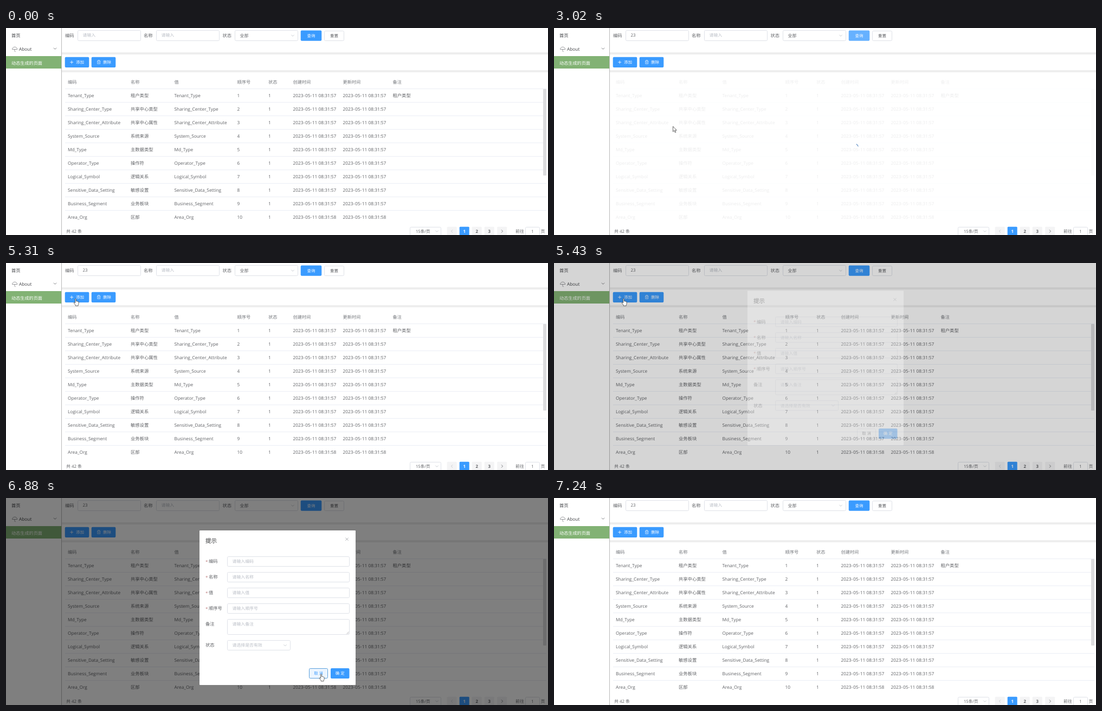
These frames come from a looping animation (1000x383 px, 8.61 s). An HTML page:

```html
<!DOCTYPE html>
<html lang="zh-CN">
<head>
<meta charset="utf-8">
<style>
html, body { margin: 0; height: 100%; overflow: hidden; background: #fff; }
svg { display: block; width: 100%; height: 100%; }
text {
  font-family: "Open Sans", "Noto Sans CJK SC", "Noto Sans CJK", sans-serif;
  text-rendering: geometricPrecision;
  white-space: pre;
}
.dash { letter-spacing: .09em; }
</style>
</head>
<body>
<svg id="stage" viewBox="0 0 1000 383"></svg>
<script>
const LOOP = 8610;
const BLUE = '#3a9bff', HOVER = '#66b1ff', INK = '#606266', HINT = '#bbbfc7';
const EDGE = '#dfe2e8', EDGE_HOVER = '#b4b8c0', TEAL = '#45aec4';

// Markup helpers; text is placed by its vertical centre.
const text = (x, y, str, { fill = INK, size = 8.3, anchor = 'start', weight = 400, id = '' } = {}) =>
  `<text id="${id}" x="${x}" y="${y + size * 0.36}" fill="${fill}" font-size="${size}" text-anchor="${anchor}" font-weight="${weight}">${str}</text>`;
const rect = (x, y, w, h, fill, extra = '') =>
  `<rect x="${x}" y="${y}" width="${w}" height="${h}" fill="${fill}" ${extra}/>`;
const line = (d, stroke = INK, width = 0.8) =>
  `<path d="${d}" fill="none" stroke="${stroke}" stroke-width="${width}"/>`;
const box = (x, y, w, h, extra = '') =>
  rect(x + 0.5, y + 0.5, w - 1, h - 1, '#fff', `rx="2" stroke="${EDGE}" ${extra}`);
const field = (x, y, w, h, hint, id = '') =>
  box(x, y, w, h, 'class="field"') + text(x + 9.5, y + Math.min(h, 19) / 2, hint, { fill: HINT, size: 7.9, id });
const chevron = (x, y, stroke = HINT) => line(`M${x - 2.6} ${y - 1.3}l2.6 2.6l2.6 -2.6`, stroke);
const button = (x, y, w, h, label, id, labelX = x + w / 2) =>
  rect(x, y, w, h, BLUE, `rx="2" id="${id}"`) +
  text(labelX, y + h / 2, label, { fill: '#fff', size: 7.5, anchor: 'middle', weight: 500 });

const sidebar = () =>
  rect(102, 0, 1, 383, '#b8b8b8') +
  text(10, 14, '首页', { fill: '#404246' }) +
  line('M11.5 39.5a4.6 4.4 0 0 1 9.2 0zM16 39.5v3.2q0 1.2 1.6 1', '#707276', 0.7) +
  text(24, 39.5, 'About', { fill: '#404246' }) + chevron(90.5, 38, INK) +
  rect(0, 52, 102, 23, '#82b274') +
  text(10, 65, '动态生成的页面', { fill: '#fff', size: 8.15 });

const toolbars = () =>
  rect(103, 45, 897, 4, '#eee') + rect(103, 78, 897, 4, '#eee') +
  text(109, 14, '编码') + field(132, 4, 117, 20, '请输入', 'code') +
  `<g id="focus">${line('M151 9.5v9', '#333')}
    <circle cx="238" cy="13.5" r="3.2" fill="none" stroke="${HINT}" stroke-width=".7"/>
    ${line('M236.9 12.4l2.2 2.2m0 -2.2l-2.2 2.2', HINT, 0.6)}</g>` +
  text(254, 14, '名称') + field(277, 4, 117, 20, '请输入') +
  text(399.5, 14, '状态') + field(422, 4, 117, 20, '') + text(431.5, 14, '全部', { size: 7.9 }) + chevron(529, 14) +
  button(543.7, 4.5, 38.6, 19.2, '查询', 'query') +
  box(587, 5, 37, 19) + text(605.5, 14.3, '重置', { size: 7.5, anchor: 'middle' }) +
  button(108.7, 53.7, 44.6, 19.2, '添加', 'add', 136.5) + line('M118.2 63.3h6M121.2 60.3v6', '#fff') +
  button(157.7, 53.7, 44.6, 19.2, '删除', 'del', 186.5) +
  line('M168 61.3h6.4M169.8 61v-1.3h2.8v1.3M168.8 61.3v5h4.8v-5M170.4 63v2M172 63v2', '#fff', 0.6);

const COLS = [114, 230, 310.5, 426.5, 484, 529.5, 621.5, 713.5];
const NAMES = ['Tenant_Type 租户类型', 'Sharing_Center_Type 共享中心类型', 'Sharing_Center_Attribute 共享中心属性',
  'System_Source 系统来源', 'Md_Type 主数据类型', 'Operator_Type 操作符', 'Logical_Symbol 逻辑关系',
  'Sensitive_Data_Setting 敏感设置', 'Business_Segment 业务板块', 'Area_Org 区部'];
const table = () => {
  const row = (cells, y, style) => cells.map((c, i) => text(COLS[i], y, c, style)).join('');
  const rule = y => rect(109, y, 888, 1, '#ebeef5');
  const head = ['编码', '名称', '值', '顺序号', '状态', '创建时间', '更新时间', '备注'];
  const body = NAMES.map((entry, i) => {
    const [code, name] = entry.split(' ');
    const stamp = `2023-05-11 08:31:5${i < 9 ? 7 : 8}`.replace(/-/g, '<tspan class="dash">-</tspan>');
    return row([code, name, code, i + 1, 1, stamp, stamp, i ? '' : name], 125 + 25 * i) +
      (i < 9 ? rule(137 + 25 * i) : '');
  });
  return rect(109, 0, 882, 25, '#f5f7fa', 'id="rowHover"') +
    row(head, 100, { fill: '#75787d', size: 8.2 }) + rule(112) + body.join('') +
    rect(991, 113, 6, 160, '#dcdcde', 'rx="1"');
};

const pager = () => {
  const cell = (x, label, on) => rect(x - 0.3, 367.7, 18, 16, on ? BLUE : '#f4f4f5', 'rx="1.5"') +
    text(x + 8.7, 376, label, { fill: on ? '#fff' : INK, size: 7.8, anchor: 'middle', weight: 700 });
  return text(111, 376, '共 42 条', { size: 7.9 }) +
    box(745, 368, 58, 17) + text(756, 376.3, '15条/页', { size: 7.6 }) + chevron(795, 376) +
    cell(814, '') + line('M824 373.4l-2.6 2.6l2.6 2.6', HINT) +
    cell(837, 1, true) + cell(860, 2) + cell(883, 3) +
    cell(906.5, '') + line('M914 373.4l2.6 2.6l-2.6 2.6') +
    text(940, 376, '前往', { size: 7.9 }) + box(958, 368, 27, 17) +
    text(971.5, 376, 1, { size: 7.6, anchor: 'middle' }) + text(986.5, 376, '页', { size: 7.9 });
};

const dialog = () =>
  rect(357, 60, 288, 286, '#fff', 'rx="1"') +
  text(368, 79, '提示', { fill: '#303133', size: 10.6 }) +
  line('M626.3 73.5l5.4 5.4m0 -5.4l-5.4 5.4', '#909399', 0.7) +
  ['编码', '名称', '值', '顺序号'].map((name, i) => {
    const y = 117.5 + 29 * i;
    return text(368, y + 0.5, '*', { fill: '#c08484' }) + text(374, y, name) +
      field(408, y - 9.5, 226, 19, '请输入' + name);
  }).join('') +
  text(368, 233.5, '备注') + field(408, 224, 226, 29, '请输入备注') +
  line('M628.5 251.5l4 -4M630.8 251.5l1.7 -1.7', '#909399', 0.6) +
  text(368, 272.5, '状态') + field(408, 263, 117, 19, '请选择是否有效') + chevron(515, 272.5) +
  box(559, 315, 35, 19, 'id="cancel"') +
  text(576.5, 324.5, '取 消', { size: 7.4, anchor: 'middle', id: 'cancelText' }) +
  button(599, 315, 34.5, 19, '确 定', 'ok');

const POINTERS = [
  'M0 0V9.8L2.3 7.7L3.9 11.4L5.4 10.7L3.8 7.2H6.8Z',
  'M-.9 .8Q0 -.6 .9 .8V5Q2 4.2 2.6 5.2Q3.7 4.6 4.2 5.7Q5.6 5.4 5.6 7V9.6Q5.4 11 4.6 12V13.4H-.3V12L-3.1 8.6Q-3.6 7 -2.2 7L-.9 8.2Z',
  'M-1.5 -5H1.5M0 -5V5M-1.5 5H1.5'
];

const stage = document.getElementById('stage');
stage.innerHTML = `
  <g id="page">${sidebar()}${toolbars()}${table()}${rect(103, 358, 897, 25, '#fff')}${pager()}</g>
  <g id="mask">${rect(107, 85, 890, 273, '#fff', 'fill-opacity=".88"')}
    <circle id="spinner" cx="552" cy="223" r="10" fill="none" stroke="#5f8fc4" stroke-width="1.2" stroke-linecap="round"/></g>
  ${rect(0, 0, 1000, 383, '#000', 'id="shade"')}
  <g id="dialog">${dialog()}</g>
  <path id="pointer" fill="#fff" stroke="#333" stroke-width=".75" stroke-linejoin="round"/>`;

const $ = id => document.getElementById(id);
const set = (id, attrs) => Object.entries(attrs).forEach(([k, v]) => $(id).setAttribute(k, v));
const pageFields = [...stage.querySelectorAll('#page .field')];
const dialogFields = [...stage.querySelectorAll('#dialog .field')];

// Pointer keys: time, x, y, shape (arrow, hand, text beam).
const KEYS = [
  [500, 957, 371, 0], [740, 600, 200, 0], [980, 150, 70, 0], [1100, 98, 34, 0], [1220, 160, 15, 2],
  [1620, 165, 15, 2], [1700, 230, 26, 0], [1940, 529, 30, 0], [2060, 556, 15, 1], [2540, 562, 13, 1],
  [2660, 520, 40, 0], [3020, 219.5, 182, 0], [3140, 190, 180, 0], [3500, 97, 85, 0],
  [3740, 128.5, 65.8, 1], [5490, 128.5, 65.8, 1], [5550, 128.5, 65.8, 0], [5790, 330, 104, 0],
  [5910, 440, 117, 2], [6150, 500, 118, 2], [6270, 540, 175, 2], [6390, 584, 290, 0],
  [6510, 581.5, 325.5, 1], [7240, 581.5, 325.5, 1]
];
const pointerAt = t => {
  const i = KEYS.findLastIndex(k => k[0] <= t);
  if (i < 0 || i === KEYS.length - 1) return null;
  const [a, b] = [KEYS[i], KEYS[i + 1]];
  const f = (t - a[0]) / (b[0] - a[0]);
  return { x: a[1] + (b[1] - a[1]) * f, y: a[2] + (b[2] - a[2]) * f, shape: a[3] };
};

const BURSTS = [[6760, 7240], [5190, 6510], [500, 4820]];
const stepTime = t => {
  const burst = BURSTS.find(b => t >= b[0]);
  return burst ? Math.min(burst[1], burst[0] + Math.floor((t - burst[0]) / 120) * 120) : 0;
};
const ramp = (t, start) => 1 - (1 - Math.min(1, Math.max(0, (t - start) / 300))) ** 1.8;
const within = (t, a, b) => t >= a && t < b;

function spin(t) {
  const ms = 1650 + (t - 3020) * 1.07;
  const phase = ((ms % 1500) + 1500) % 1500 / 750;
  const swing = (1 - Math.cos(Math.PI * (phase % 1))) / 2;
  const dash = phase < 1 ? 1 + 89 * swing : 90;
  const offset = phase < 1 ? 40 * swing : 40 + 80 * swing;
  set('spinner', {
    'stroke-dasharray': `${dash / 2} 100`,
    'stroke-dashoffset': -offset / 2,
    transform: `rotate(${ms * 0.18} 552 223)`
  });
}

function render(t) {
  const p = pointerAt(t);
  const loading = ramp(t, 2480) - ramp(t, 4500);
  const open = ramp(t, 5370) - ramp(t, 6930);
  const focused = within(t, 1220, 2420);
  const typed = t < 1460 ? '' : t < 1580 ? '2' : '23';

  $('code').textContent = typed || '请输入';
  set('code', { fill: typed ? INK : HINT });
  set('focus', { opacity: focused && typed === '23' ? 1 : 0 });
  set('query', { fill: within(t, 2060, 4580) ? HOVER : BLUE });
  set('add', { fill: within(t, 3740, 5310) ? HOVER : BLUE });

  const live = open > 0 ? dialogFields : pageFields;
  for (const f of [...pageFields, ...dialogFields]) {
    const [x, y, w, h] = ['x', 'y', 'width', 'height'].map(k => +f.getAttribute(k));
    const over = p && live.includes(f) && within(p.x, x, x + w) && within(p.y, y, y + h);
    f.setAttribute('stroke', over ? EDGE_HOVER : EDGE);
  }
  if (focused) pageFields[0].setAttribute('stroke', TEAL);

  const row = p ? Math.floor((p.y - 112.5) / 25) : -1;
  const rowLit = p && !loading && !open && p.x > 109 && row >= 0 && row < 10;
  set('rowHover', { y: 112.5 + 25 * row, opacity: rowLit ? 1 : 0 });

  set('mask', { opacity: loading });
  spin(t);
  set('shade', { opacity: open / 2 });
  set('dialog', { opacity: open, transform: `translate(0 ${-13 * (1 - open)})` });

  const onCancel = within(t, 6500, 7240);
  set('cancel', {
    fill: onCancel ? '#ecf5ff' : '#fff',
    stroke: t >= 6760 && onCancel ? '#5a9fdc' : onCancel ? '#c6e2ff' : EDGE
  });
  set('cancelText', { fill: onCancel ? BLUE : INK });

  set('pointer', { opacity: p ? 1 : 0 });
  if (p) set('pointer', { d: POINTERS[p.shape], transform: `translate(${p.x} ${p.y})` });
}

function tick() {
  render(stepTime(performance.now() % LOOP));
  requestAnimationFrame(tick);
}
tick();
</script>
</body>
</html>
```
